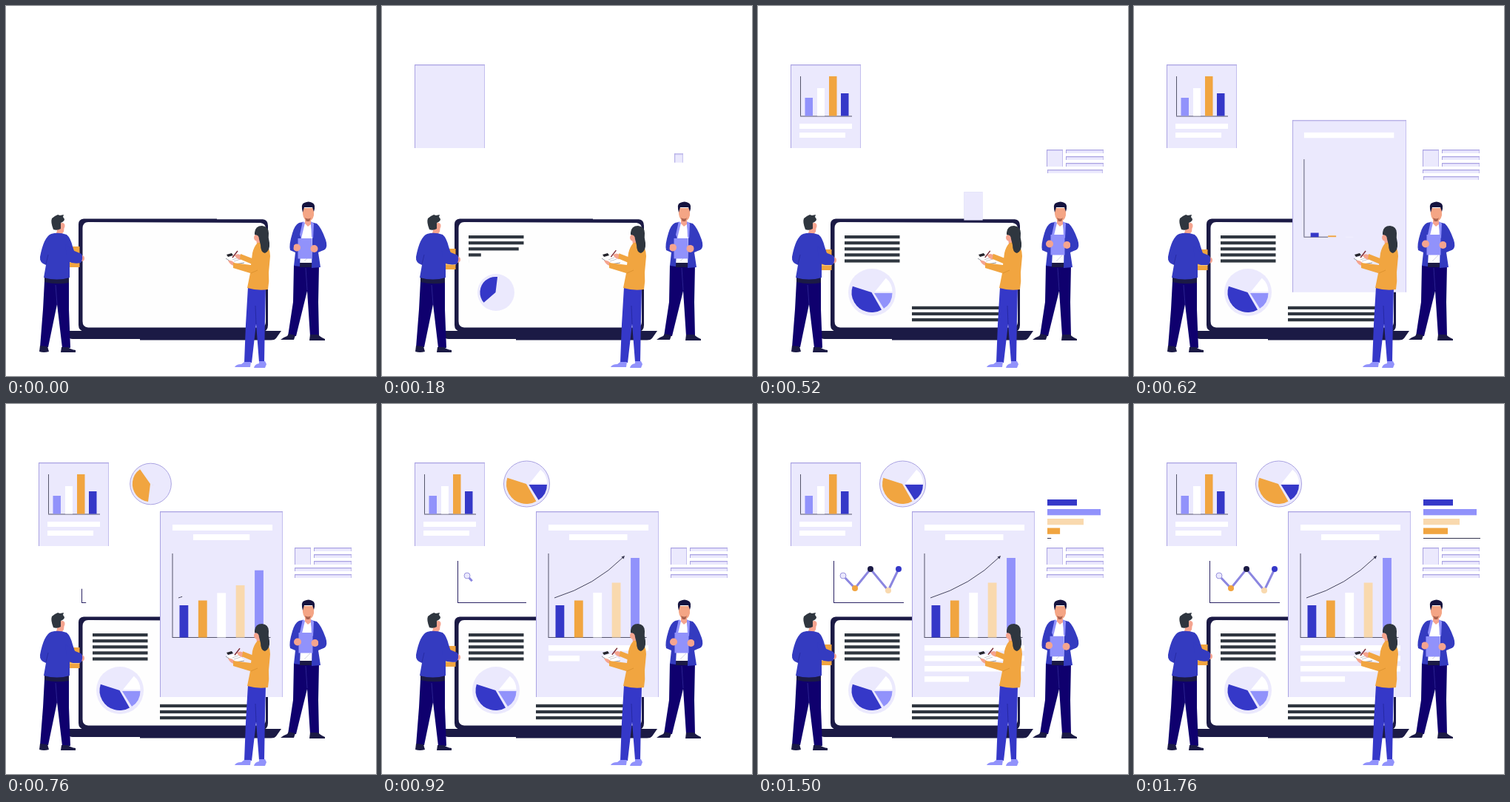
An HTML page with a canvas for the animation above (1780 ms loop, 500 by 500 pixels).

```html
<!DOCTYPE html>
<html lang="en">
<head>
<meta charset="utf-8">
<title>Team report</title>
<style>
  html, body { margin: 0; width: 100%; height: 100%; overflow: hidden; background: #fff; }
  canvas { display: block; }
</style>
</head>
<body>
<canvas id="stage" width="500" height="500"></canvas>
<script>
const g = document.getElementById('stage').getContext('2d');
const LOOP = 1780;
const BLUE = '#3538c8', JACKET = '#343bc0', LILAC = '#9192fb', ORANGE = '#f1a540', PEACH = '#f9d9ae',
  PALE = '#ebe9fd', EDGE = '#aaa3e2', SOFT = '#d8d4f6', NAVY = '#1b1a45', INK = '#0f006e',
  SLATE = '#2f363f', SKIN = '#f5a48f', WHITE = '#fff';
let t = 0;

// Eased progress of a move that starts at `start` and lasts `dur` ms.
function ease(start, dur) {
  const p = Math.min(1, Math.max(0, (t - start) / dur));
  return p < .5 ? 4 * p ** 3 : 1 - 4 * (1 - p) ** 3;
}

function rect(x, y, w, h, color) {
  g.fillStyle = color;
  g.fillRect(x, y, w, h);
}

function fill(d, color) {
  g.fillStyle = color;
  g.fill(new Path2D(d));
}

function line(d, color, width = 1, dash = []) {
  g.strokeStyle = color;
  g.lineWidth = width;
  g.setLineDash(dash);
  g.stroke(new Path2D(d));
  g.setLineDash([]);
}

function disc(x, y, r, color, edge) {
  if (r <= 0) return;
  g.beginPath();
  g.arc(x, y, r, 0, 7);
  g.fillStyle = color;
  g.fill();
  if (edge) { g.strokeStyle = edge; g.lineWidth = 1; g.stroke(); }
}

function moved(x, y, draw) {
  g.save();
  g.translate(x, y);
  draw();
  g.restore();
}

function scaled(x, y, s, draw) {
  if (s <= 0) return;
  g.save();
  g.translate(x, y);
  g.scale(s, s);
  g.translate(-x, -y);
  draw();
  g.restore();
}

// Pale sheet with a soft shade along the top and sides.
function sheet(x, y, w, h) {
  rect(x, y, w, h, PALE);
  rect(x + 1, y + 1, w - 2, 1, SOFT);
  rect(x + w - 1, y, 1, h, '#c3beee');
  rect(x, y, 1, h, EDGE);
  rect(x, y, w, 1, EDGE);
}

function popSheet(x, y, w, h, start, dur = 100) {
  const s = ease(start, dur);
  if (s > 0) sheet(x + w * (1 - s) / 2, y + h * (1 - s) / 2, w * s, h * s);
}

function wide(x, y, w, h, color, start, dur = 150) {
  rect(x, y, w * ease(start, dur), h, color);
}

function tall(x, top, w, base, color, start, dur = 170) {
  const h = (base - top) * ease(start, dur);
  rect(x, base - h, w, h, color);
}

function axes(x, top, base, w, start, dur, color = '#55556b') {
  const p = ease(start, dur), h = (base - top) * Math.min(1, p * 5);
  rect(x, base - h, 1, h, color);
  rect(x, base, w * p, 1, color);
}

function wedge(x, y, r, from, to, color, s) {
  if (s <= 0) return;
  const turn = 360 * (1 - s), rad = Math.PI / 180;
  g.beginPath();
  g.moveTo(x, y);
  g.arc(x, y, r * s, (from + turn) * rad, (to + turn) * rad);
  g.fillStyle = color;
  g.fill();
}

function pie(x, y, r, start, main, side, edge) {
  const s = ease(start, 200);
  disc(x, y, r * s, PALE, edge);
  wedge(x - .5, y, 27, 60, 198, main, s);
  wedge(x + 3, y + 1, 24.5, 0, 58, side, ease(start + 120, 130));
  wedge(x + 4, y - 1, 23.5, -51, 0, WHITE, ease(start + 170, 130));
}

function laptop() {
  fill('M105 287.5H285V288.3H347Q354 289 354 297V431Q354 440 346 440H106Q98 439 98 431V295Q98 288 105 287.5Z', NAVY);
  fill('M111 292L344 293Q351 294 351 301V427Q351 434.5 343 434.5H111Q103.5 434 103.5 426V300Q104 292 111 292Z', '#fefefe');
  fill('M84 439H372L365 449Q363 451.5 358 451.5H181V450H90Q85 450 84 446Z', NAVY);
  for (let i = 0; i < 5; i++) wide(117, 310 + 8.1 * i, 74.5, 4.2, SLATE, 15 + 40 * i, 120);
  for (let i = 0; i < 3; i++) wide(208, 405.8 + 8.1 * i, 127, 4.2, SLATE, 260 + 50 * i);
  pie(154, 387, 32, 57, BLUE, LILAC);
}

function barCard() {
  popSheet(44, 79, 95, 113, 10, 150);
  axes(57, 95, 148.5, 70, 180, 150);
  tall(63.5, 124, 10.5, 148.5, LILAC, 230);
  tall(80, 111, 10, 148.5, WHITE, 260);
  tall(96, 95, 10.5, 148.5, ORANGE, 290);
  tall(112, 118, 10.5, 148.5, BLUE, 320);
  wide(56, 159, 71, 7, WHITE, 300);
  wide(56, 171, 62, 7, WHITE, 350);
}

function list() {
  popSheet(390, 194, 22, 23, 130);
  [[416, 194, 51], [416, 203, 51], [416, 212, 51], [390, 221, 77], [390, 230, 77]]
    .forEach(([x, y, w], i) => popSheet(x, y, w, 5, [210, 280, 350, 440, 540][i]));
}

function report() {
  scaled(291, 270.5, ease(437, 250), () => {
    sheet(208, 145, 166, 251);
    wide(225, 163, 135, 8, WHITE, 500);
    wide(253, 176, 78.5, 8, WHITE, 640);
    axes(224.5, 202, 315, 133, 540, 200);
    [[272, BLUE], [265.5, ORANGE], [255, WHITE], [241.5, PEACH], [208, LILAC]]
      .forEach(([top, c], i) => tall(234.5 + 25.4 * i, top, 11.8, 315.5, c, 562 + 20 * i, 180));
    const p = ease(720, 180);
    if (p > 0) line('M233 262Q288 245 326 207', '#44445c', 1, [112 * p, 200]);
    if (p > .97) fill('M328 205L326.5 209.5L323.5 206.5Z', '#33334c');
    [135, 135, 135, 60].forEach((w, i) =>
      wide(225, 326 + 14 * i, w, 7.5, WHITE, [775, 857, 940, 1030][i]));
  });
}

function lineChart() {
  axes(102, 212, 268, 95, 690, 280, '#2b2465');
  const nodes = [[115, 232, PALE], [131, 249, ORANGE], [152, 223, NAVY], [176, 252, PEACH], [190, 223, BLUE]];
  const drawn = 127 * Math.min(1, (t - 890) / 400);
  if (drawn > 0) line('M' + nodes.map(n => n.slice(0, 2)).join('L'), '#8b86e0', 3, [drawn, 200]);
  let reach = 0;
  nodes.forEach(([x, y, c], i) => {
    if (i) reach += Math.hypot(x - nodes[i - 1][0], y - nodes[i - 1][1]);
    disc(x, y, 4 * ease(850 + reach * 400 / 127 + (i ? 40 : 0), 60), c, i ? null : '#9a94dd');
  });
}

function sideBars() {
  [[129, 40, BLUE], [142, 72, LILAC], [155, 49, PEACH], [167.5, 33, ORANGE]]
    .forEach(([y, w, c], i) => wide(391, y, w, 8.3, c, 1210 + 70 * i, 160));
  wide(391, 181, 77, 1, '#33334c', 1460, 160);
}

function leftMan() {
  const dy = 4 * (ease(0, 300) - ease(760, 320));
  moved(0, dy, () => {
    rect(84.5, 325, 15, 28, ORANGE);
    rect(84.5, 346, 15, 1, '#f7c683');
  });
  fill('M52 372H85L85 410L87 462H76L69 403L57 461H46L50 410Z', INK);
  line('M67 377L69 403', '#2b2290');
  fill('M46 459L56 460L58 467Q51 469 45 467Z', NAVY);
  fill('M75 461H84Q87 464 94 465V468H74Z', NAVY);
  fill('M71 296H79L78 305L74 310L68 307Z', SKIN);
  disc(75.5, 297, 4, SKIN);
  fill('M64 302Q60 292 62 287L66 284L70 282L73 283L78 282L77 285L79 288Q79 291 74 293L74 301Q69 304 64 302Z', SLATE);
  fill('M52 366L85 367V374Q68 377 52 373Z', NAVY);
  fill('M61 308Q71 305 82 309Q87 313 90 325L93 334L86 346L86 367Q69 372 51 367L54 350Q45 347 46 339Q51 312 61 308Z', JACKET);
  moved(0, dy * .6, () => {
    disc(102, 341, 4, SKIN);
    fill('M80 322L90 330L102 335Q105 341 101 347Q92 349 83 345Z', JACKET);
  });
  line('M54 349L57 336', '#25279c', .8);
}

function rightMan() {
  fill('M389 350H423L422 400L423 446H411L407 385L392 446H381L388 400Z', INK);
  line('M405 354L407 384', '#2b2290');
  fill('M382 443L391 445L389 451H371Q374 448 380 446Z', NAVY);
  fill('M411 444H422Q424 447 431 450V452H410Z', NAVY);
  rect(398, 293, 16, 55, WHITE);
  fill('M404 284H412V295L408 298L404 294Z', SKIN);
  fill('M401 273H416V283Q414 291 408 291Q402 289 401 281Z', '#f4a585');
  fill('M404 286Q409 289 412 286L410 291H406Z', '#a9624f');
  fill('M401 279Q398 267 403 266Q409 263 414 266Q419 268 416 278L414 272H403Z', '#15133f');
  rect(397, 347, 17, 6, NAVY);
  fill('M401 292L396 293Q390 296 387 307Q382 323 384 330L391 333L389 351L397 352L399 310Z', JACKET);
  fill('M412 292L420 294Q426 299 432 316Q435 325 431 329L422 333L425 353L413 354L414 312Z', JACKET);
  fill('M401 291L404 293L399 314L397 309Z', LILAC);
  fill('M412 291L416 294L415 314L413 312Z', LILAC);
  line('M403 345L411 337', '#c9c9dc', .8);
  const lift = ease(120, 360) - ease(1240, 340);
  moved(lift, -5 * lift, () => {
    rect(394.5, 314, 19, 27.5, LILAC);
    disc(393, 326.5, 5, SKIN);
    disc(416.5, 328, 5, SKIN);
  });
  fill('M384 321L389 324L388 331L384 329Z', JACKET);
  fill('M422 321L431 317Q435 326 429 330L422 331Z', JACKET);
}

function woman() {
  fill('M327 380H351L350 420L349 481H342L338 430L332 482H322L324 430Z', BLUE);
  line('M337 405L338 430', '#23259a', .8);
  fill('M322 481H331L330 488H309Q311 484 318 484Z', LILAC);
  fill('M342 480H350L352 484L350 489H335Q336 484 342 483Z', LILAC);
  disc(340, 313, 5, SKIN);
  fill('M338 313H347V324L339 323Z', SKIN);
  fill('M297 341L312 337L323 347L309 350Z', WHITE);
  line('M297 341L309 349L322 347', '#777b86', .8);
  fill('M298 336L305 334L307 337L300 339Z', '#23232b');
  line('M306 343L314 340M308 345L317 342', '#b8bac4', .8);
  fill('M300 344Q304 343 309 347L308 351Q303 350 300 344Z', SKIN);
  const sway = 2.5 - 2.5 * Math.cos(6 * Math.PI * t / LOOP);
  moved(sway, -sway * .25, () => {
    fill('M309 337Q314 333 319 338L317 343Q311 342 309 337Z', SKIN);
    line('M306 340L313 331', '#7a2a35', 1.4);
    fill('M317 335L335 342V350L316 342Z', ORANGE);
  });
  fill('M340 320L349 319Q357 326 357 338L355 360Q356 372 354 383Q340 385 326 381Q328 371 330 361L307 354V347L331 350L333 334Q335 325 340 320Z', ORANGE);
  line('M331 361L340 357', '#d98f2d', .8);
  fill('M336 306Q337 297 346 297Q355 298 355 307Q354 313 356 320Q357 331 350 334Q344 333 344 323L342 315Q342 309 336 309Z', SLATE);
}

function frame() {
  t = performance.now() % LOOP;
  rect(0, 0, 500, 500, WHITE);
  [laptop, barCard, list, report, lineChart, sideBars].forEach(draw => draw());
  pie(195.5, 108, 31, 620, ORANGE, BLUE, EDGE);
  [leftMan, rightMan, woman].forEach(draw => draw());
  requestAnimationFrame(frame);
}
frame();
</script>
</body>
</html>
```
